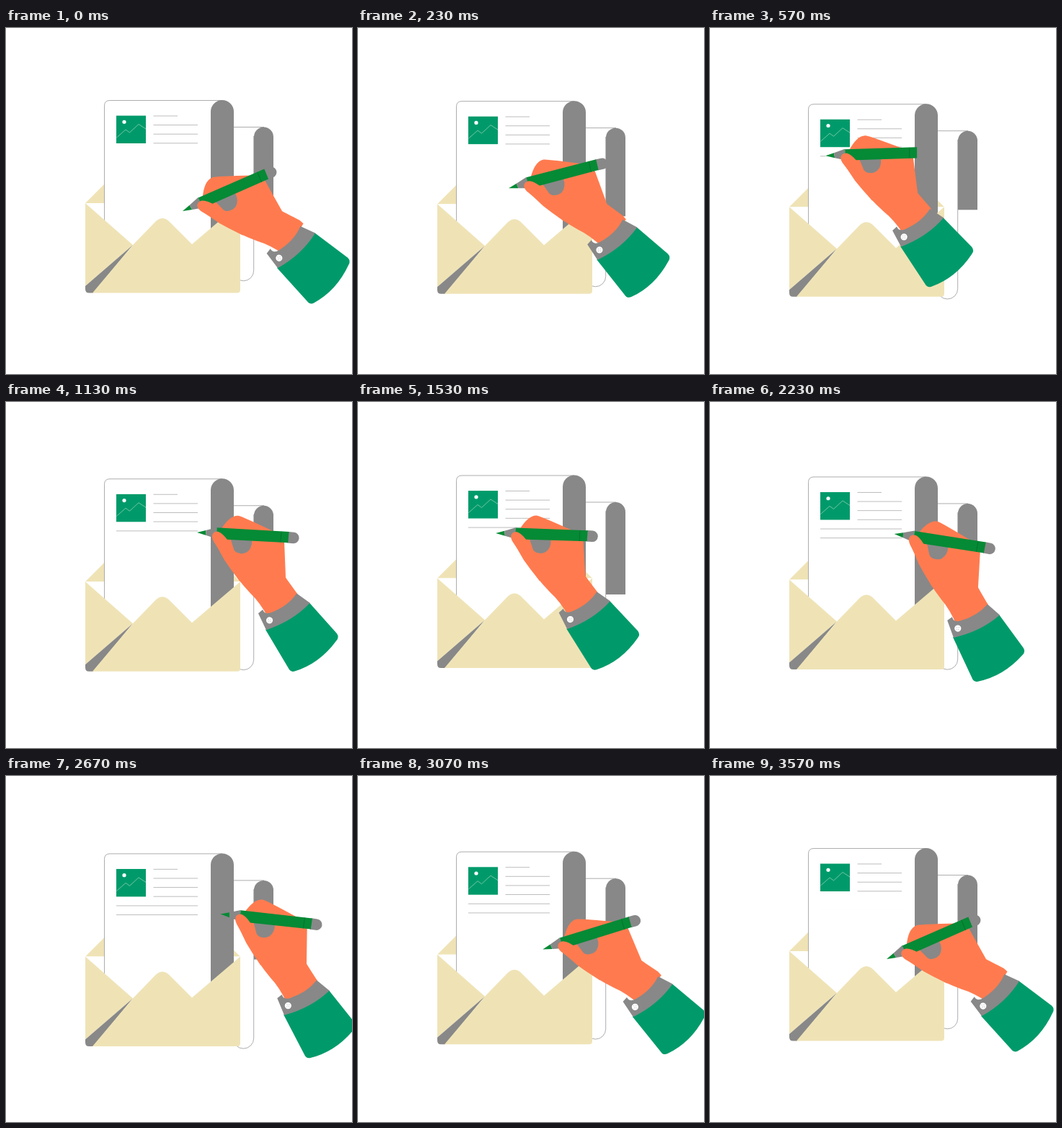
Write an HTML page that moves like this. It is 480 px wide and 480 px high and loops after 3600 ms.

```html
<!DOCTYPE html>
<html lang="en">
<head>
<meta charset="utf-8">
<title>Writing a letter</title>
<style>
  html, body { margin: 0; width: 100%; height: 100%; overflow: hidden; background: #fff; }
  svg { display: block; width: 100vw; height: 100vh; }
  .gray { fill: #888; }
  .paper { fill: #fff; }
  .beige { fill: #efe3b6; }
  .green { fill: #009a6a; }
  .pen { fill: #058a35; }
  .skin { fill: #ff7b4f; }
  .edge { fill: #fff; stroke: #999; stroke-width: .8; }
  .rule { fill: none; stroke: #bdbdbd; stroke-width: 1; }
  .thin { fill: none; stroke-width: .8; }
</style>
</head>
<body>
<svg viewBox="0 0 480 480">
  <g id="letter">
    <path id="backPage" class="edge"/>
    <path id="backRoll" class="gray"/>

    <path class="beige" d="M110 243 L217 136 L325 243Z"/>
    <path class="paper" d="M110 243 H325 L258 301 H176Z"/>

    <path class="edge" d="M136.5 300 V108 Q136.5 100.5 144 100.5 H300 V300"/>
    <path class="gray" d="M284 300 V116 A16 16 0 0 1 316 116 V300Z"/>
    <rect class="green" x="153" y="121.6" width="41" height="38.4"/>
    <circle class="paper" cx="164" cy="130.3" r="2.6"/>
    <path class="thin" stroke="#8ed0b5" d="M153.5 152 L166 141 L171.5 145 L184 133.5 L194 140"/>
    <path id="text" class="rule"/>
    <path id="lineA" class="rule"/>
    <path id="lineB" class="rule"/>

    <path class="beige" d="M110 243 L176 301 L110 358Z"/>
    <path class="gray" d="M176 301 L110 358 V362 Q110 367.5 115 367.5 H121Z"/>
    <path class="beige" d="M120 367.5 L176 301 L208 268 Q217 260 226 268 L258 300 L325 243 V363 Q325 367.5 320.5 367.5Z"/>
  </g>

  <g id="hand">
    <path class="skin" d="M192 170 C198 158 206 149 215 149.500 Q220 150 268 168 Q280 173 281 182 L287 229 Q291 234 305 250 L308 256 L268 287
      Q254 266 240 255 Q220 237 200 212 L184 188Z"/>
    <path class="gray" d="M206 182 H236 Q237 193 230 199 Q222 204 213 199Z"/>
    <path class="pen" d="M159 177.500 L171 173.500 L172 180.500Z"/>
    <path class="gray" d="M171 173.500 L186 168 L188 184 L172 180.500Z"/>
    <path class="gray" d="M285 165.500 H293 A7.700 7.700 0 0 1 293 181 H285Z"/>
    <path class="pen" d="M186 168.300 L286 165.500 V180.700 L187 184Z"/>
    <path class="thin" stroke="#04702b" d="M275.500 166 V181"/>
    <path class="skin" d="M184 189 C177 180 181 173 189 174 Q195 176 201 183 Q206 192 215 200 L232 212 L224 240Z"/>

    <g id="arm">
      <path class="green" d="M263 303 Q300 289 322 263 L362 304 Q366 309 362 314 Q340 347 306 359 Q300 361 297 355Z"/>
      <path class="gray" d="M252 281 L258 275.500 Q261 283 270 279 Q293 269 304 251 L323 263.500 Q300 290 264 303.500Z"/>
      <circle class="paper" cx="268" cy="290" r="4.600"/>
      <path class="thin" stroke="#aaa" stroke-dasharray="1.500 2.500" d="M266 288 L270 292 M270 288 L266 292"/>
    </g>
  </g>
</svg>
<script>
const LOOP = 3600, BOB = 1800;
const LEFT = 153, RIGHT = 266;
const $ = id => document.getElementById(id);

const clamp = (v, a, b) => Math.min(b, Math.max(a, v));
const ease = (t, a, b) => (1 - Math.cos(Math.PI * clamp((t - a) / (b - a), 0, 1))) / 2;
const mix = (p, q, u) => p.map((v, i) => v + (q[i] - v) * u);

// pen tip x, pen tip y, hand angle, wrist bend
const REST = [245, 254, -23.5, 13];
const START_A = [158, 177.3, -1.7, 0];
const END_A = [265, 181, 3.4, -2.5];
const START_B = [154, 182.5, 1.4, -2.5];
const END_B = [261, 183, 9.4, -2.5];
const AWAY = [297.5, 191.5, 6.5, -2.5];

const WRITE_A = [520, 1090], WRITE_B = [2000, 2270];
const MOVES = [
  { span: [0, 520], to: START_A },
  { span: WRITE_A, to: END_A },
  { span: [1130, 1790], to: START_B },
  { span: WRITE_B, to: END_B },
  { span: [2270, 2660], to: AWAY },
  { span: [2690, 3240], to: REST }
];

const poseAt = t => MOVES.reduce((pose, { span, to }) => mix(pose, to, ease(t, ...span)), REST);

function drawLine(id, y, t, [from, until], tip, fade) {
  const end = t < from ? LEFT : t < until ? clamp(tip, LEFT, RIGHT) : RIGHT;
  $(id).setAttribute('d', `M${LEFT} ${y} H${end}`);
  $(id).setAttribute('opacity', 1 - ease(t, fade, fade + 300));
}

// The sheet slides over its top roll: what the front gains, the flap loses.
function drawBackPage(t) {
  const slide = 20 * (ease(t, 0, 580) - ease(t, 840, 1680));
  const low = 336.5 + slide, flap = 267 - slide;
  $('backPage').setAttribute('d', `M300 137.5 H358 L343.7 150 V${low} A14.3 14.3 0 0 1 315.1 ${low}`);
  $('backRoll').setAttribute('d', `M344 ${flap} V151 A13.5 13.5 0 0 1 371 151 V${flap}Z`);
}

function drawText() {
  let d = '';
  for (let i = 0; i < 4; i++) d += `M204.5 ${122 + 12.6 * i} H${i ? RIGHT : 238}`;
  $('text').setAttribute('d', d);
}

function render(t) {
  const bob = 3.7 * (1 - Math.cos(2 * Math.PI * t / BOB));
  $('letter').setAttribute('transform', `translate(0 ${bob})`);
  drawBackPage(t % BOB);

  const [x, y, turn, bend] = poseAt(t);
  $('hand').setAttribute('transform', `translate(${x} ${y}) rotate(${turn + 1.6}) translate(-159 -177.5)`);
  $('arm').setAttribute('transform', `rotate(${bend} 273 249)`);

  drawLine('lineA', 172.6, t, WRITE_A, x, 3200);
  drawLine('lineB', 185.2, t, WRITE_B, x + 11, 3300);
}

drawText();
const start = performance.now();
function tick() {
  render((performance.now() - start) % LOOP);
  requestAnimationFrame(tick);
}
tick();
</script>
</body>
</html>
```
